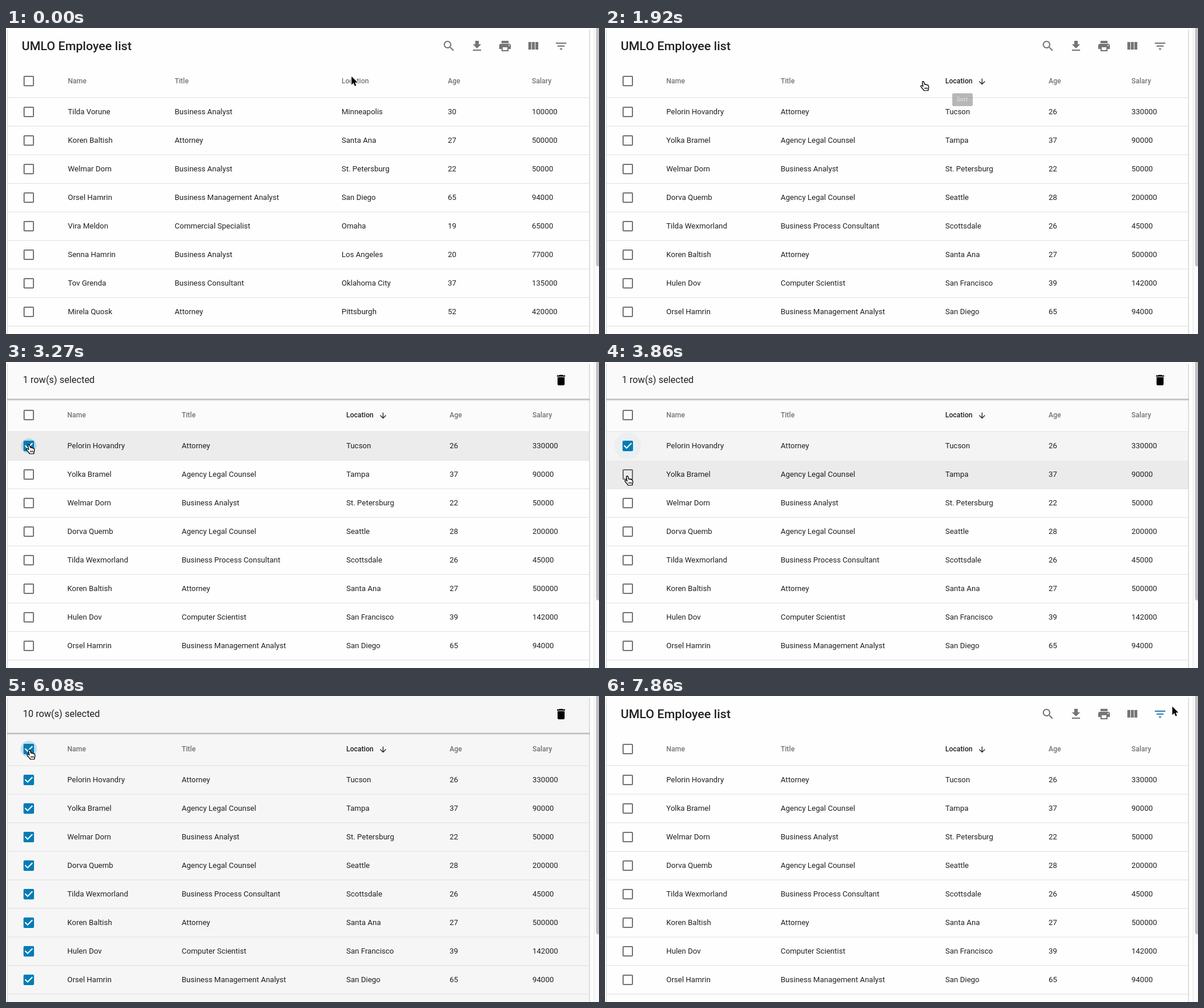
Animation, 1016 px wide and 525 px high, one loop 8 s. Source, as an HTML page with a canvas:

```html
<!DOCTYPE html>
<html lang="en">
<head>
<meta charset="utf-8">
<title>Employee list</title>
<style>
  html, body { margin: 0; height: 100%; overflow: hidden; background: #fff; }
  canvas { display: block; }
</style>
</head>
<body>
<canvas id="stage" width="1016" height="525"></canvas>
<script>
const ctx = document.getElementById('stage').getContext('2d');
const LOOP = 8000, ROW = 49;
const TEXT = 'rgba(0,0,0,.87)', MUTED = 'rgba(0,0,0,.54)', BLUE = '#027cb5';
const HEADERS = ['Name', 'Title', 'Location', 'Age', 'Salary'];

const table = (columns, text) => ({ columns, rows: text.trim().split('\n').map(line => line.split('|')) });
const TABLES = {
  plain: table([106, 289, 575, 757, 901], `
Tilda Vorune|Business Analyst|Minneapolis|30|100000
Koren Baltish|Attorney|Santa Ana|27|500000
Welmar Dorn|Business Analyst|St. Petersburg|22|50000
Orsel Hamrin|Business Management Analyst|San Diego|65|94000
Vira Meldon|Commercial Specialist|Omaha|19|65000
Senna Hamrin|Business Analyst|Los Angeles|20|77000
Tov Grenda|Business Consultant|Oklahoma City|37|135000
Mirela Quosk|Attorney|Pittsburgh|52|420000`),
  up: table([112, 308, 556, 739, 892], `
Brul Tavon|Corporate Counselor|Arlington|44|80000
Ellorin Pask|Industrial Analyst|Austin|31|170000
Dorva Kemt|Business Analyst|Baltimore|44|99000
Welmar Sovin|Industrial Analyst|Buffalo|49|190000
Pelorin Gask|Business Consultant|Chicago|24|133000
Vira Osk|Corporate Counselor|Cincinnati|52|180000
Nalo Verdusk|Industrial Analyst|Hartford|34|110000
Olbe Tarmondy|Agency Legal Counsel|Laredo|30|150000`),
  down: table([105, 301, 583, 760, 902], `
Pelorin Hovandry|Attorney|Tucson|26|330000
Yolka Bramel|Agency Legal Counsel|Tampa|37|90000
Welmar Dorn|Business Analyst|St. Petersburg|22|50000
Dorva Quemb|Agency Legal Counsel|Seattle|28|200000
Tilda Wexmorland|Business Process Consultant|Scottsdale|26|45000
Koren Baltish|Attorney|Santa Ana|27|500000
Hulen Dov|Computer Scientist|San Francisco|39|142000
Orsel Hamrin|Business Management Analyst|San Diego|65|94000`)
};

const ICONS = {
  search: 'M15.5 14h-.79l-.28-.27C15.41 12.59 16 11.11 16 9.5 16 5.91 13.09 3 9.5 3S3 5.91 3 9.5 5.91 16 9.5 16c1.61 0 3.09-.59 4.23-1.57l.27.28v.79l5 4.99L20.49 19l-4.99-5zm-6 0C7.01 14 5 11.99 5 9.5S7.01 5 9.5 5 14 7.01 14 9.5 11.99 14 9.5 14z',
  download: 'M19 9h-4V3H9v6H5l7 7 7-7zM5 18v2h14v-2H5z',
  print: 'M19 8H5c-1.66 0-3 1.34-3 3v6h4v4h12v-4h4v-6c0-1.66-1.34-3-3-3zm-3 11H8v-5h8v5zm3-7c-.55 0-1-.45-1-1s.45-1 1-1 1 .45 1 1-.45 1-1 1zm-1-9H6v4h12V3z',
  columns: 'M10 18h5V5h-5v13zm-6 0h5V5H4v13zM16 5v13h5V5h-5z',
  filter: 'M10 18h4v-2h-4v2zM3 6v2h18V6H3zm3 7h12v-2H6v2z',
  trash: 'M6 19c0 1.1.9 2 2 2h8c1.1 0 2-.9 2-2V7H6v12zM19 4h-3.5l-1-1h-5l-1 1H5v2h14V4z',
  arrow: 'M20 12l-1.41-1.41L13 16.17V4h-2v12.17l-5.58-5.59L4 12l8 8 8-8z',
  box: 'M19 5v14H5V5h14m0-2H5c-1.1 0-2 .9-2 2v14c0 1.1.9 2 2 2h14c1.1 0 2-.9 2-2V5c0-1.1-.9-2-2-2z',
  checked: 'M19 3H5c-1.11 0-2 .9-2 2v14c0 1.1.89 2 2 2h14c1.11 0 2-.9 2-2V5c0-1.1-.89-2-2-2zm-9 14l-5-5 1.41-1.41L10 14.17l7.59-7.59L19 8l-9 9z'
};
for (const name in ICONS) ICONS[name] = new Path2D(ICONS[name]);
const TOOLS = ['search', 'download', 'print', 'columns', 'filter'];

const POINTER = new Path2D('M0 0V14.5L3.4 11.3 5.6 16.4 8 15.4 5.8 10.4H10.4Z');
const HAND = new Path2D('M3.6 2.2C3.6.6 5.8.4 6.4 1.9L7.7 6.2C8.3 5.4 9.7 5.5 10 6.6 10.6 6 11.9 6.1 12.2 7.2 13.2 6.8 14.3 7.4 14.4 8.5L14.6 11.2C14.6 12.6 14 13.4 13.6 14.6V16.5H6.6C6 14.6 4.2 13.2 2.4 11.2 1.2 9.6.9 8.6 1.6 8 2.5 7.3 3.6 8.1 4.6 9.2L5 9.4Z');
const FINGERS = new Path2D('M8 11V14M10 11V14M12 11V14');

// Each step changes part of the state; ripple is [row, radius, alpha], row -1 is the header.
const STEPS = [
  [0, { at: [592, 83], hand: false, view: 'plain', sort: 0, turn: 0, tip: 0, count: 0, tint: [0, 0], ripple: null }],
  [300, { at: [590, 87], hand: true }],
  [440, { at: [590, 89] }],
  [740, { tip: .5 }],
  [890, { tip: 1 }],
  [1030, { view: 'up', sort: .6, turn: Math.PI }],
  [1180, { sort: 1 }],
  [1770, { view: 'down', turn: Math.PI / 3 }],
  [1920, { at: [540, 91], turn: 0, tip: .5 }],
  [2070, { at: [330, 88], hand: false, tip: 0 }],
  [2220, { at: [110, 82] }],
  [2370, { at: [14, 86] }],
  [2520, { at: [35, 92], hand: true }],
  [2820, { at: [36, 111] }],
  [2970, { at: [35, 127], tint: [.05, 0] }],
  [3120, { at: [34, 141], tint: [.07, 0] }],
  [3270, { count: 1, ripple: [0, 13, .2] }],
  [3410, { ripple: [0, 20, .18] }],
  [3560, { ripple: [0, 23, .12] }],
  [3710, { at: [33, 172], tint: [.05, .04], ripple: [0, 23, .08] }],
  [3860, { at: [33, 195], tint: [.04, .075], ripple: [0, 23, .035] }],
  [4160, { count: 2, ripple: [1, 14, .2] }],
  [4310, { ripple: [1, 20, .15] }],
  [4460, { ripple: [1, 22, .08] }],
  [4750, { count: 1, ripple: [1, 14, .12] }],
  [4900, { ripple: [1, 22, .06] }],
  [5040, { at: [32, 180], ripple: null }],
  [5190, { at: [31, 156], tint: [.04, .04] }],
  [5340, { at: [33, 142], tint: [.07, 0] }],
  [5480, { count: 0, ripple: [0, 14, .12] }],
  [5630, { at: [34, 118], tint: [.03, 0], ripple: [0, 22, .06] }],
  [5780, { at: [35, 92], tint: [0, 0], ripple: null }],
  [5930, { count: 10, ripple: [-1, 7, .2] }],
  [6080, { ripple: [-1, 14, .2] }],
  [6230, { ripple: [-1, 20, .14] }],
  [6370, { ripple: [-1, 22, .06] }],
  [6970, { count: 0, ripple: [-1, 14, .12] }],
  [7120, { at: [75, 88], hand: false, ripple: [-1, 22, .05] }],
  [7270, { at: [350, 68], ripple: null }],
  [7415, { at: [680, 62] }],
  [7560, { at: [896, 36] }],
  [7710, { at: [948, 24] }],
  [7860, { at: [972, 18] }]
];

const stateAt = time => Object.assign({}, ...STEPS.filter(([start]) => start <= time).map(step => step[1]));

function rect(x, y, w, h, color) {
  ctx.fillStyle = color;
  ctx.fillRect(x, y, w, h);
}

function text(str, x, y, size, color = TEXT, weight = 400) {
  ctx.font = `${weight} ${size}px Roboto, sans-serif`;
  ctx.fillStyle = color;
  ctx.fillText(str, x, y);
}

function icon(name, cx, cy, color, size = 24, turn = 0) {
  ctx.save();
  ctx.translate(cx, cy);
  ctx.rotate(turn);
  ctx.scale(size / 24, size / 24);
  ctx.translate(-12, -12);
  ctx.fillStyle = color;
  ctx.fill(ICONS[name]);
  ctx.restore();
}

function checkbox(y, on) {
  if (on) rect(32, y - 7, 14, 14, '#fff');
  icon(on ? 'checked' : 'box', 39, y, on ? BLUE : MUTED);
}

function drawFrame() {
  rect(0, 0, 1016, 525, '#fefefe');
  rect(2, 3, 1, 522, '#d4d4d4');
  rect(999, 3, 1, 522, '#d4d4d4');
  rect(1000, 3, 1, 522, '#ececec');
  rect(1007, 0, 9, 525, '#fafafa');
  rect(1007, 0, 1, 525, '#e8e8e8');
  ctx.fillStyle = '#c1c1c1';
  ctx.beginPath();
  ctx.roundRect(1011, -10, 9, 419, 4);
  ctx.fill();
}

function drawToolbar({ count, at: [x, y] }) {
  if (count) {
    const shadow = ctx.createLinearGradient(0, 62, 0, 67);
    shadow.addColorStop(0, 'rgba(0,0,0,.4)');
    shadow.addColorStop(1, 'rgba(0,0,0,0)');
    rect(2, 63, 998, 4, shadow);
    rect(3, 0, 996, 63, count === 10 ? '#f6f6f6' : '#fafafa');
    text(`${count} row(s) selected`, 29, 36, 16);
    icon('trash', 951, 31, '#000');
    return;
  }
  text('UMLO Employee list', 27, 38, 21, TEXT, 500);
  TOOLS.forEach((name, i) => {
    const cx = 759 + 48 * i;
    const hovered = Math.abs(x - cx) < 24 && y < 55;
    icon(name, cx, 31, hovered ? '#307bb5' : MUTED);
  });
}

function drawTable({ view, sort, turn, count, tint, ripple }) {
  const { columns, rows } = TABLES[view];
  const all = count === 10;
  const shade = i => all ? .033 : tint[i] || 0;
  if (count) rect(3, 64, 996, 55, all ? '#f6f6f6' : '#fbfbfb');
  for (let i = 0; i < 9; i++) {
    const top = 120 + ROW * i;
    rect(3, top, 996, ROW, `rgba(0,0,0,${shade(i)})`);
    const merged = !all && i && shade(i) && shade(i - 1);
    if (!merged) rect(3, top - 1, 996, 1, '#e0e0e0');
  }
  if (ripple) {
    const [row, radius, alpha] = ripple;
    const on = row < count && (row >= 0 || all);
    ctx.fillStyle = on ? `rgba(2,124,181,${alpha})` : `rgba(0,0,0,${alpha})`;
    ctx.beginPath();
    ctx.arc(39, row < 0 ? 91 : 144 + ROW * row, radius, 0, 7);
    ctx.fill();
  }
  checkbox(91, all);
  HEADERS.forEach((label, c) =>
    text(label, columns[c], 95, 12, c === 2 && sort ? TEXT : MUTED, 500));
  if (sort) icon('arrow', columns[2] + 63, 92, `rgba(0,0,0,${.87 * sort})`, 16, turn);
  rows.forEach((cells, i) => {
    checkbox(144 + ROW * i, i < count);
    cells.forEach((cell, c) => text(cell, columns[c], 148 + ROW * i, 13));
  });
}

function drawTooltip({ tip }) {
  if (!tip) return;
  ctx.globalAlpha = tip;
  ctx.fillStyle = '#737373';
  ctx.beginPath();
  ctx.roundRect(595, 112, 35, 22, 2);
  ctx.fill();
  text('Sort', 602.5, 126, 10, '#fff', 500);
  ctx.globalAlpha = 1;
}

function drawCursor({ at, hand }) {
  ctx.save();
  ctx.translate(...at);
  ctx.lineJoin = 'round';
  ctx.lineWidth = hand ? 1.2 : 2;
  ctx.strokeStyle = hand ? '#000' : '#fff';
  ctx.fillStyle = hand ? '#fff' : '#000';
  const shape = hand ? HAND : POINTER;
  ctx.stroke(shape);
  ctx.fill(shape);
  if (hand) {
    ctx.stroke(shape);
    ctx.lineWidth = 1;
    ctx.stroke(FINGERS);
  }
  ctx.restore();
}

function draw() {
  const state = stateAt(performance.now() % LOOP);
  drawFrame();
  drawTable(state);
  drawToolbar(state);
  drawTooltip(state);
  drawCursor(state);
  requestAnimationFrame(draw);
}
draw();
</script>
</body>
</html>
```
